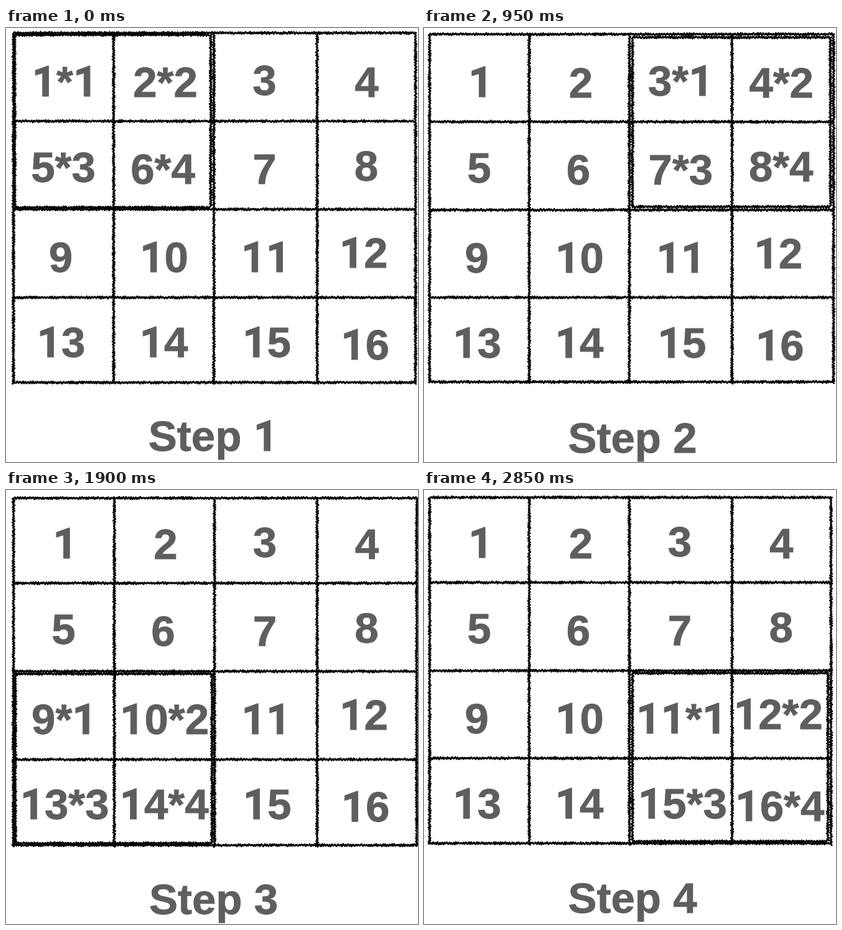
An HTML page that plays this animation: 662x699 px, repeating every 3.8 s.

```html
<!DOCTYPE html>
<html lang="en">
<head>
<meta charset="utf-8">
<title>Grid steps</title>
<style>
  html, body { margin: 0; width: 100%; height: 100%; overflow: hidden; background: #fff; }
  svg { display: block; width: 662px; height: 699px; }
  text {
    font: bold 69px "Liberation Sans", Arial, sans-serif;
    font-kerning: none;
    text-anchor: middle;
    fill: #5e5e5e;
    stroke: #5e5e5e;
    stroke-width: 0.8;
  }
  .one { font-family: Roboto, sans-serif; }
  path { fill: none; stroke: #000; stroke-width: 2.9; stroke-linejoin: round; stroke-linecap: round; }
</style>
</head>
<body>
<svg id="stage" viewBox="0 0 662 699"></svg>
<script>
const STEP_MS = 950;

// Centre of each number, row by row
const CELLS = [
  [94.5, 86], [256, 87], [415.5, 84], [579.5, 87],
  [92, 224], [252, 227], [415.5, 227], [579, 222],
  [88, 369], [254, 369], [417.4, 369], [574.5, 362],
  [88.5, 506], [253.5, 506], [419, 506], [577, 510]
];

// first: top-left cell of the highlighted window; nudge: x shift of its left column
const STEPS = [
  { xs: [12, 173, 334, 500, 658], ys: [8, 150, 292, 434, 571],
    box: [14, 11, 329, 289], first: 0, nudge: 0, scale: 1, dx: 0, dy: 0, label: [333, 681] },
  { xs: [9, 169, 330, 495, 658], ys: [10, 151, 293, 434, 570],
    box: [335, 15, 653, 288], first: 2, nudge: 1.5, scale: 0.996, dx: -3, dy: 1, label: [335, 684] },
  { xs: [12, 174, 335, 500, 660], ys: [13, 150, 292, 434, 572],
    box: [15, 296, 331, 569], first: 8, nudge: 5, scale: 1, dx: 0.5, dy: 0, label: [333.5, 683] },
  { xs: [9, 169, 330, 495, 654], ys: [12, 149, 291, 432, 569],
    box: [335, 295, 649, 566], first: 10, nudge: 1, scale: 0.996, dx: -3, dy: -1, label: [335, 681] }
];

const stage = document.getElementById("stage");

function add(parent, tag, attrs = {}, content = "") {
  const el = document.createElementNS("http://www.w3.org/2000/svg", tag);
  for (const key in attrs) el.setAttribute(key, attrs[key]);
  el.textContent = content;
  return parent.appendChild(el);
}

// The digit 1 is set in a face that draws it without a foot
function addText(parent, x, y, content) {
  const text = add(parent, "text", { x, y });
  for (const part of content.split(/(1)/)) {
    if (part) add(text, "tspan", part === "1" ? { class: "one" } : {}, part);
  }
}

let seed = 7;
function random() {
  seed = (seed * 16807) % 2147483647;
  return seed / 2147483647;
}

// Rough crayon stroke: a dense zigzag along one axis
function roughLine(parent, vertical, at, from, to) {
  const points = [];
  let side = 1;
  for (let p = from; p <= to; p += 1.2 + random() * 1.6) {
    const q = at + side * (0.5 + random() * 1.4);
    side = -side;
    points.push((vertical ? [q, p] : [p, q]).map(v => v.toFixed(1)).join(" "));
  }
  add(parent, "path", { d: "M" + points.join("L") });
}

function drawStep(step, n) {
  const g = add(stage, "g");
  const { xs, ys, box: [left, top, right, bottom], first } = step;
  xs.forEach(x => roughLine(g, true, x, ys[0], ys[4] + 3));
  ys.forEach(y => roughLine(g, false, y, xs[0], xs[4]));
  [left, right].forEach(x => roughLine(g, true, x, top, bottom));
  [top, bottom].forEach(y => roughLine(g, false, y, left, right));

  const factors = { [first]: 1, [first + 1]: 2, [first + 4]: 3, [first + 5]: 4 };
  CELLS.forEach(([x, y], i) => {
    const factor = factors[i];
    const shift = factor % 2 ? step.nudge : 0;
    addText(g, x * step.scale + step.dx + shift, y + 24 + step.dy,
      factor ? `${i + 1}*${factor}` : `${i + 1}`);
  });
  addText(g, ...step.label, `Step ${n + 1}`);
  return g;
}

const groups = STEPS.map(drawStep);
const start = performance.now();

function render(now) {
  const current = Math.floor(Math.max(0, now - start) / STEP_MS) % STEPS.length;
  groups.forEach((g, i) => { g.style.display = i === current ? "" : "none"; });
  requestAnimationFrame(render);
}
render(start);
</script>
</body>
</html>
```
